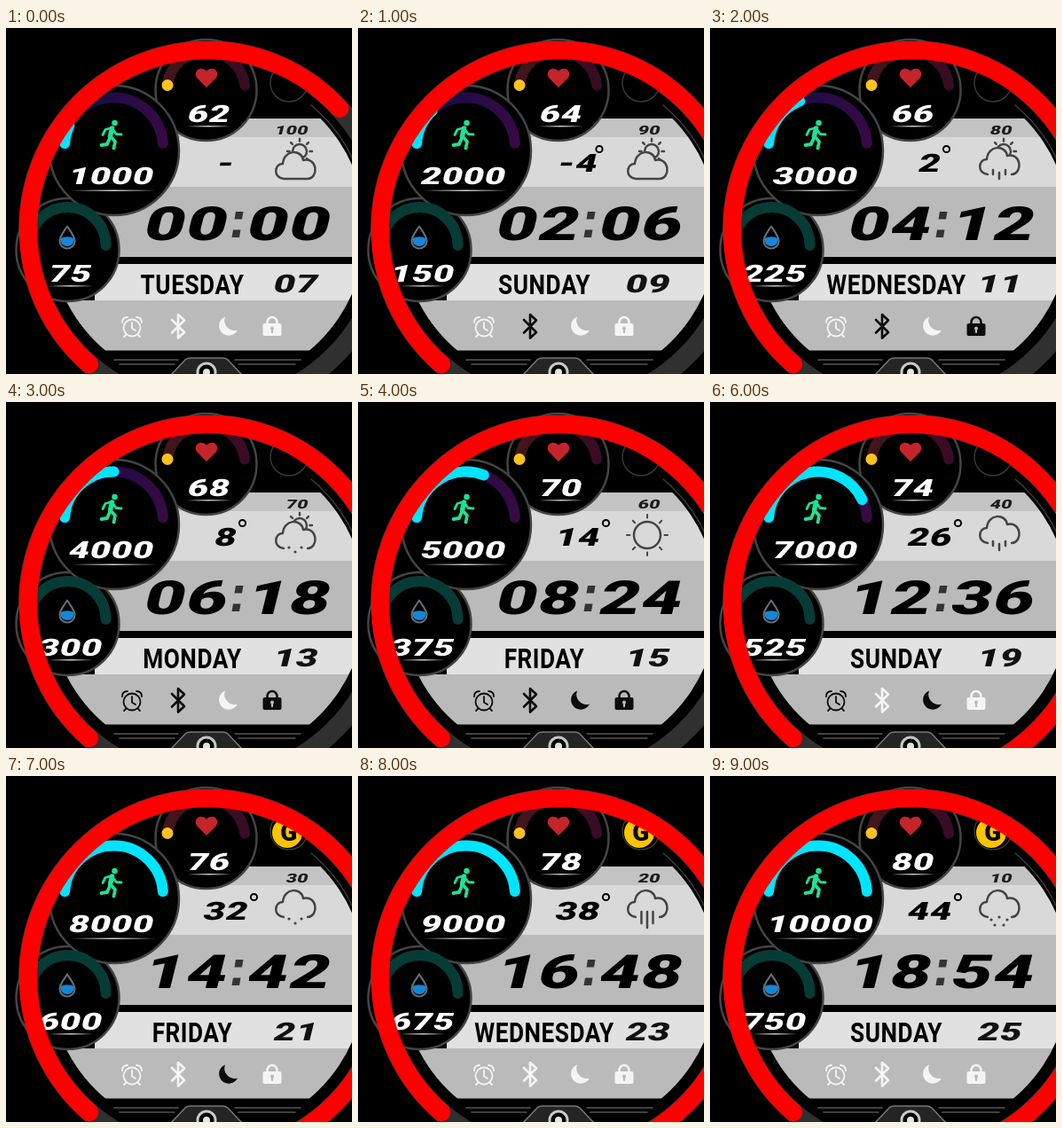
Write an HTML page that moves like this. It is 390 px wide and 390 px high and loops after 10000 ms.

```html
<!DOCTYPE html>
<html lang="en">
<head>
<meta charset="utf-8">
<title>Watch face</title>
<style>
html, body { margin: 0; width: 100%; height: 100%; overflow: hidden; background: #000; }
svg { display: block; width: 100vw; height: 100vh; }
.num { font-family: Roboto, "Liberation Sans", sans-serif; font-weight: 900; letter-spacing: .018em; }
.day { font-family: Roboto, "Liberation Sans", sans-serif; font-weight: 600; font-size: 32px; letter-spacing: .02em; }
.line { fill: none; stroke-linecap: round; stroke-linejoin: round; }
</style>
</head>
<body>
<svg viewBox="0 0 390 390">
  <defs>
    <clipPath id="dial"><circle cx="227" cy="227" r="178.500"/></clipPath>
    <linearGradient id="stepTrack"><stop offset="0" stop-color="#0b1238"/><stop offset=".5" stop-color="#230b47"/><stop offset="1" stop-color="#360a42"/></linearGradient>
    <linearGradient id="heartTrack"><stop offset="0" stop-color="#43151c"/><stop offset="1" stop-color="#3a0b25"/></linearGradient>
    <linearGradient id="fade"><stop offset="0" stop-color="#fff" stop-opacity="0"/><stop offset=".5" stop-color="#ccc"/><stop offset="1" stop-color="#fff" stop-opacity="0"/></linearGradient>
  </defs>

  <rect width="390" height="390"/>
  <circle cx="227" cy="227" r="202" fill="none" stroke="#303030" stroke-width="22"/>
  <path d="M344 87A182 182 0 0 1 400 171" class="line" stroke="#3b3b3b" stroke-width="1.5"/>
  <g clip-path="url(#dial)">
    <rect x="110" y="102" width="280" height="21" fill="#c3c3c3"/>
    <rect x="110" y="123" width="280" height="56" fill="#d9d9d9"/>
    <rect x="110" y="179" width="280" height="79" fill="#bababa"/>
    <rect x="100" y="266" width="290" height="41" fill="#e1e1e1"/>
    <rect x="40" y="307" width="350" height="56.500" fill="#bababa"/>
  </g>

  <!-- bottom tab -->
  <g class="line" stroke="#555" stroke-width="1.5">
    <path d="M122 374H194M258 374H332M128 379H190M262 379H326"/>
    <path d="M186 391L202 374Q204 372 208 372H244Q248 372 250 374L266 391" fill="#242424" stroke="#777"/>
  </g>
  <circle cx="226" cy="388" r="10" fill="#000" stroke="#c8c8c8" stroke-width="3"/>
  <circle cx="226" cy="388" r="4" fill="#e4e4e4"/>

  <!-- sub-dials -->
  <g stroke="#444" stroke-width="2.5">
    <circle cx="319" cy="62" r="21" stroke="#363636" stroke-width="1.5"/>
    <circle cx="225.500" cy="70" r="57"/>
    <circle cx="69.500" cy="250" r="58"/>
    <circle cx="122" cy="138" r="73"/>
  </g>
  <g id="gauges" class="line" stroke-width="12"></g>
  <circle cx="182" cy="64.500" r="6.500" fill="#ffc31f"/>
  <path d="M226 67L215.500 56.500C210 50 218 41 226 48.500C234 41 242 50 236.500 56.500Z" fill="#c4242b"/>

  <g class="line" stroke="#1fe093" stroke-width="3.800">
    <path d="M119.500 113L117.500 122" stroke-width="5.500"/>
    <path d="M117.500 122L123 128L121.500 135.500"/>
    <path d="M117 124L114 131L107.500 132"/>
    <path d="M119 112.500L112 114.500L109 120.500M120 113.500L124 119.500L130 120" stroke-width="2.800"/>
  </g>
  <circle cx="122.500" cy="107" r="3.300" fill="#1fe093"/>

  <path d="M61.500 237Q69 233.500 76.500 237C78 249 60 249 61.500 237Z" fill="#1686d9"/>
  <path class="line" d="M69 223.500C65 230 60.500 234.500 60.500 240A8.500 8.500 0 0 0 77.500 240C77.500 234.500 73 230 69 223.500Z" stroke="#66717a" stroke-width="2"/>
  <g fill="url(#fade)">
    <rect x="204" y="110" width="50" height="1.500"/>
    <rect x="74" y="182.500" width="95" height="1.500"/>
    <rect x="48" y="290" width="50" height="1.500"/>
  </g>

  <g id="goal">
    <circle cx="317" cy="64" r="17" fill="#ffc400"/>
    <text class="num" x="319" y="73" font-size="28" text-anchor="middle">G</text>
  </g>

  <path d="M259 207H267.500L266 215.500H257.500ZM256 227.500H264.500L263 236H254.500Z" fill="#333"/>
  <g id="labels"></g>
  <text id="day" class="day" text-anchor="middle" transform="translate(210 299.500) scale(.82 1)"></text>
  <circle id="degree" r="3.600" fill="none" stroke="#000" stroke-width="2"/>
  <g id="weather" class="line" stroke="#454545" stroke-width="2.500"></g>

  <!-- status icons, coloured through "color" -->
  <g id="alarm" class="line" stroke="currentColor" stroke-width="1.800">
    <circle cx="142" cy="338" r="9.500"/>
    <path d="M142 332V338.500L146 341M131 332Q131 326 137 326M153 332Q153 326 147 326M135.500 345.500L133 348M148.500 345.500L151 348"/>
  </g>
  <path id="bluetooth" class="line" d="M187 329L201 343L194 349.500V323L201 329.500L187 343.500" stroke="currentColor" stroke-width="2.600"/>
  <path id="moon" d="M247 325.500A11 11 0 1 0 261 340.500A11.500 11.500 0 0 1 247 325.500Z" fill="currentColor"/>
  <g id="lock">
    <path class="line" d="M294.500 334V331.500A5.500 5.500 0 0 1 305.500 331.500V334" stroke="currentColor" stroke-width="2.600"/>
    <rect x="289.500" y="333" width="21" height="14" rx="2" fill="currentColor"/>
    <path d="M300 338V343" class="line" stroke="#bababa" stroke-width="2.200"/>
    <circle cx="300" cy="338.500" r="2" fill="#bababa"/>
  </g>

  <path id="ring" class="line" stroke="#f00" stroke-width="20.500"/>
</svg>

<script>
const NS = 'http://www.w3.org/2000/svg';
const $ = id => document.getElementById(id);

function add(parent, tag, attrs) {
  const el = document.createElementNS(NS, tag);
  for (const key in attrs) el.setAttribute(key, attrs[key]);
  return parent.appendChild(el);
}

// Clockwise arc; angles in degrees, 0 pointing right.
function arc(cx, cy, r, from, to) {
  const point = a => {
    const q = a * Math.PI / 180;
    return (cx + r * Math.cos(q)).toFixed(2) + ' ' + (cy + r * Math.sin(q)).toFixed(2);
  };
  return `M${point(from)}A${r} ${r} 0 ${to - from > 180 ? 1 : 0} 1 ${point(to)}`;
}

// Wide slanted label centred on x, y with the given digit height.
function label(x, y, height, fill, anchor = 'middle') {
  const size = height / 0.711;
  return add($('labels'), 'text', {
    class: 'num', fill, x: size * 0.009, y: height / 2,
    'font-size': size, 'text-anchor': anchor,
    transform: `translate(${x} ${y}) skewX(-14) scale(1.5 1)`
  });
}

const stepArc = sweep => arc(121.5, 134, 55.5, 184, 184 + sweep);
const gauges = $('gauges');
add(gauges, 'path', { d: arc(225.5, 70, 44, 187, 353), stroke: 'url(#heartTrack)' });
add(gauges, 'path', { d: arc(69.5, 245, 43, 180, 360), stroke: '#073c36' });
add(gauges, 'path', { d: stepArc(172), stroke: 'url(#stepTrack)' });
const stepBar = add(gauges, 'path', { stroke: '#00e5ff' });

const heart = label(229, 96, 19, '#fff');
const steps4 = label(119, 166, 19, '#fff');
const steps5 = label(124.5, 166, 19, '#fff');
const energy = label(73, 276, 19, '#fff');
const battery = label(341, 115, 10, '#1c1c1c', 'end');
const temp = label(248, 152, 20, '#000');
const hours = label(204, 220.5, 37.5, '#000');
const minutes = label(320, 220.5, 37.5, '#000');
const date = label(327, 288, 20, '#111');

const days = ['TUESDAY', 'SUNDAY', 'WEDNESDAY', 'MONDAY', 'FRIDAY',
              'WEDNESDAY', 'SUNDAY', 'FRIDAY', 'WEDNESDAY', 'SUNDAY'];
const skies = ['peek cloud', 'peek cloud', 'peek cloud rain', 'peek cloud snow', 'sun',
               'cloud', 'cloud rain', 'cloud snow', 'cloud pour', 'cloud storm'];

const rays = (cx, cy, r0, r1) => {
  let d = '';
  for (let k = 0; k < 8; k++) {
    const c = Math.cos(k * Math.PI / 4), s = Math.sin(k * Math.PI / 4);
    d += `M${cx + r0 * c} ${cy + r0 * s}L${cx + r1 * c} ${cy + r1 * s}`;
  }
  return d;
};
const dots = list => list.map(([x, y]) => `M${x} ${y}h.01`).join('');
const fall = {
  rain: 'M319 157V162M326 160V167M333 157V162',
  pour: 'M319.500 153V166M326 153V171M332.500 153V166',
  snow: dots([[319, 161], [326, 166], [333, 161]]),
  storm: dots([[317, 162], [326, 159], [335, 162], [321, 168], [331, 168]])
};

function drawSky(sky) {
  const g = $('weather');
  g.replaceChildren();
  const parts = sky.split(' ');
  const wet = parts.find(p => fall[p]);
  if (parts[0] === 'sun') {
    add(g, 'circle', { cx: 326, cy: 150, r: 15 });
    add(g, 'path', { d: rays(326, 150, 19.5, 23), 'stroke-width': 2 });
    return;
  }
  const peek = parts[0] === 'peek';
  if (peek) {
    add(g, 'circle', { cx: 331, cy: 139, r: 8 });
    add(g, 'path', { d: rays(331, 139, 11.5, 14) });
  }
  const shift = (peek ? 6 : 0) - (wet ? 5 : 0);
  const end = wet ? '' : 'Z';
  add(g, 'path', {
    d: `M313 164C301 163 302 147 312 147C313 131 333 130 335 143C351 139 353 163 340 164${end}`,
    transform: `translate(0 ${shift})`, fill: '#d9d9d9'
  });
  if (wet) add(g, 'path', {
    d: fall[wet], 'stroke-width': /snow|storm/.test(wet) ? 3.2 : 2.5,
    transform: `translate(0 ${peek ? 3 : 0})`
  });
}

const pad = n => String(n).padStart(2, '0');

function draw(i) {
  const steps = (i + 1) * 1000;
  const degrees = 6 * i - 10;
  heart.textContent = 62 + 2 * i;
  steps4.textContent = steps < 10000 ? steps : '';
  steps5.textContent = steps < 10000 ? '' : steps;
  energy.textContent = 75 * (i + 1);
  battery.textContent = 100 - 10 * i;
  temp.textContent = i ? degrees : '-';
  hours.textContent = pad(2 * i);
  minutes.textContent = pad(6 * i);
  date.textContent = pad(7 + 2 * i);
  $('day').textContent = days[i];

  // The degree sign follows the width of the reading.
  const degree = $('degree');
  degree.setAttribute('visibility', i ? 'visible' : 'hidden');
  degree.setAttribute('cx', degrees < 0 ? 272 : degrees < 10 ? 266.5 : 279.5);
  degree.setAttribute('cy', 136.5);

  stepBar.setAttribute('d', stepArc(172 * Math.min(1, steps / 8000)));
  $('ring').setAttribute('d', arc(227, 227, 202, 131.2, 317.6 + 17.36 * i));
  $('goal').setAttribute('visibility', steps >= 8000 ? 'visible' : 'hidden');
  drawSky(skies[i]);

  // Each icon is dark for four seconds, one starting after another.
  ['bluetooth', 'lock', 'alarm', 'moon'].forEach((id, k) => {
    $(id).setAttribute('color', i > k && i < k + 5 ? '#0c0c0c' : '#f4f4f4');
  });
}

let shown = -1;
function tick() {
  const i = Math.floor(performance.now() % 10000 / 1000);
  if (i !== shown) draw(shown = i);
  requestAnimationFrame(tick);
}
tick();
</script>
</body>
</html>
```
